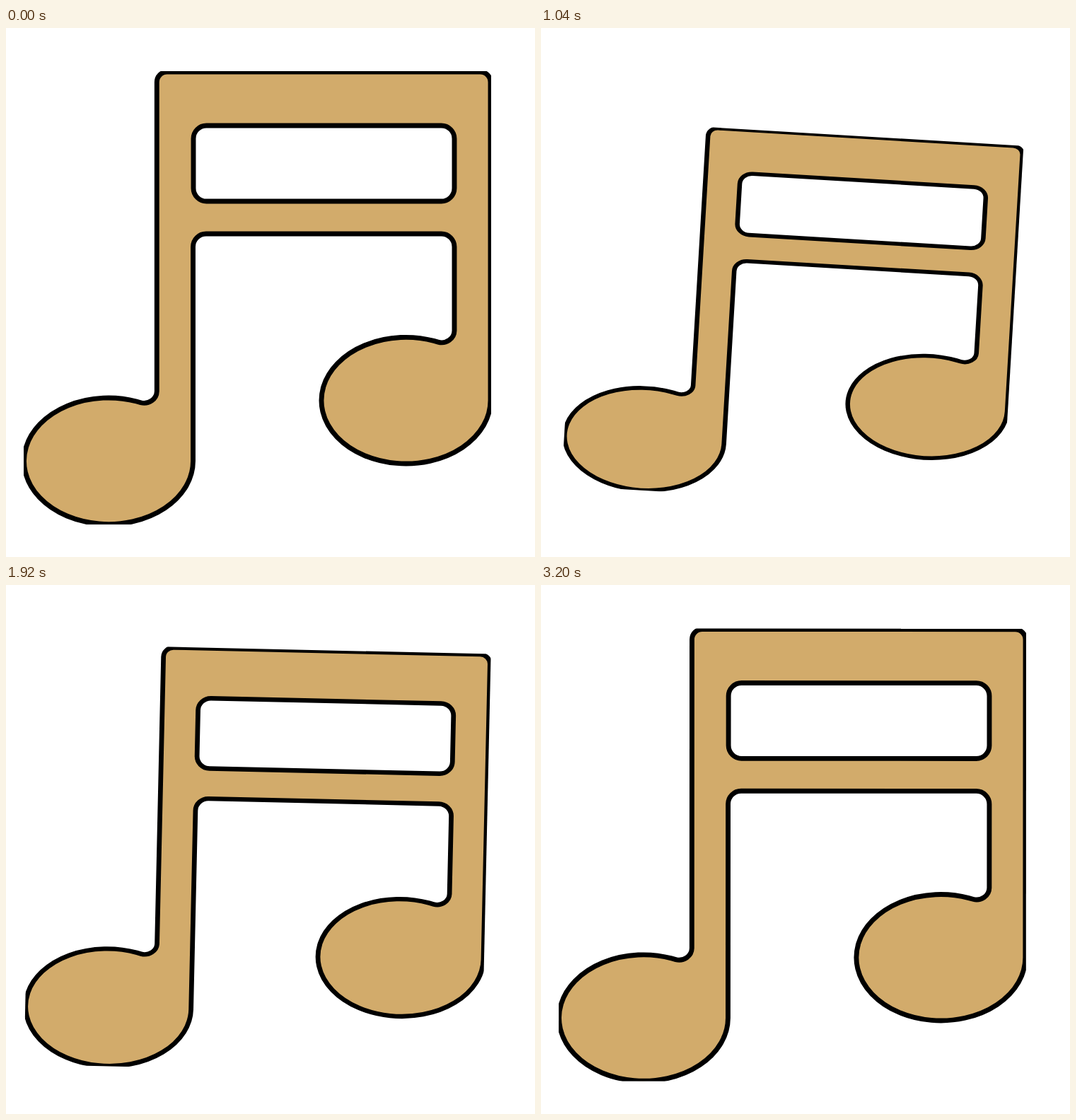
Recreate the animation shown at these times as an HTML page. Size 748 px wide and 748 px high, loop 3240 ms.

```html
<!DOCTYPE html>
<html lang="en">
<head>
<meta charset="utf-8">
<title>Bouncing note</title>
<style>
  html, body { margin: 0; width: 100%; height: 100%; overflow: hidden; background: #fff; }
  svg { display: block; width: 100vw; height: 100vh; }
  .ink { fill: #d2ab6b; fill-rule: evenodd; stroke: #000; stroke-width: 6.9; }
</style>
</head>
<body>
<svg viewBox="0 0 748 748">
  <clipPath id="crop"><rect x="25" y="61" width="661" height="641"/></clipPath>
  <g id="note">
    <g clip-path="url(#crop)">
      <path class="ink" d="
        M213.3 76.5 a14.5 14.5 0 0 1 14.5 -14.5 H670.5 a14.5 14.5 0 0 1 14.5 14.5
        V526.7 a119.5 89.3 0 1 1 -80 -84.3 l6 1.7 a18 17 0 0 0 23 -16.1
        V309.5 a18.5 18.5 0 0 0 -18.5 -18.5 H283 a18.5 18.5 0 0 0 -18.5 18.5
        V612.3 a119.5 89.3 0 1 1 -80 -84.3 l6 1.7 a18 17 0 0 0 22.8 -16.1 Z
        M283.5 138 H615.5 a18.5 18.5 0 0 1 18.5 18.5 V226.5 a18.5 18.5 0 0 1 -18.5 18.5
        H283.5 a18.5 18.5 0 0 1 -18.5 -18.5 V156.5 a18.5 18.5 0 0 1 18.5 -18.5 Z"/>
    </g>
  </g>
</svg>
<script>
  const LOOP = 3240, TICK = 40;
  const CX = 355.5, CY = 381.5;
  const note = document.getElementById('note');

  // start, end, from, to, lead of the squash over the drop
  const legs = [
    [0, 845, 0, 1, 1],
    [845, 1690, 1, 0, 1],
    [1690, 2440, 0, 1, 0.8],
    [2440, LOOP, 1, 0, 1]
  ];

  const ease = u => (1 - Math.cos(Math.PI * u)) / 2;
  const mix = (a, b, u) => a + (b - a) * u;

  function draw(now) {
    const t = Math.floor(now % LOOP / TICK) * TICK;
    const [start, end, from, to, lead] = legs.find(leg => t < leg[1]);
    const u = (t - start) / (end - start);
    const drop = mix(from, to, ease(u));
    const squash = mix(from, to, ease(u ** lead));
    note.setAttribute('transform',
      `translate(${CX} ${CY + 29 * drop}) rotate(${3.9 * squash}) ` +
      `scale(${1 - 0.064 * squash} ${1 - 0.219 * squash}) translate(${-CX} ${-CY})`);
  }

  const origin = performance.now();
  function frame() {
    draw(performance.now() - origin);
    requestAnimationFrame(frame);
  }
  frame();
</script>
</body>
</html>
```
